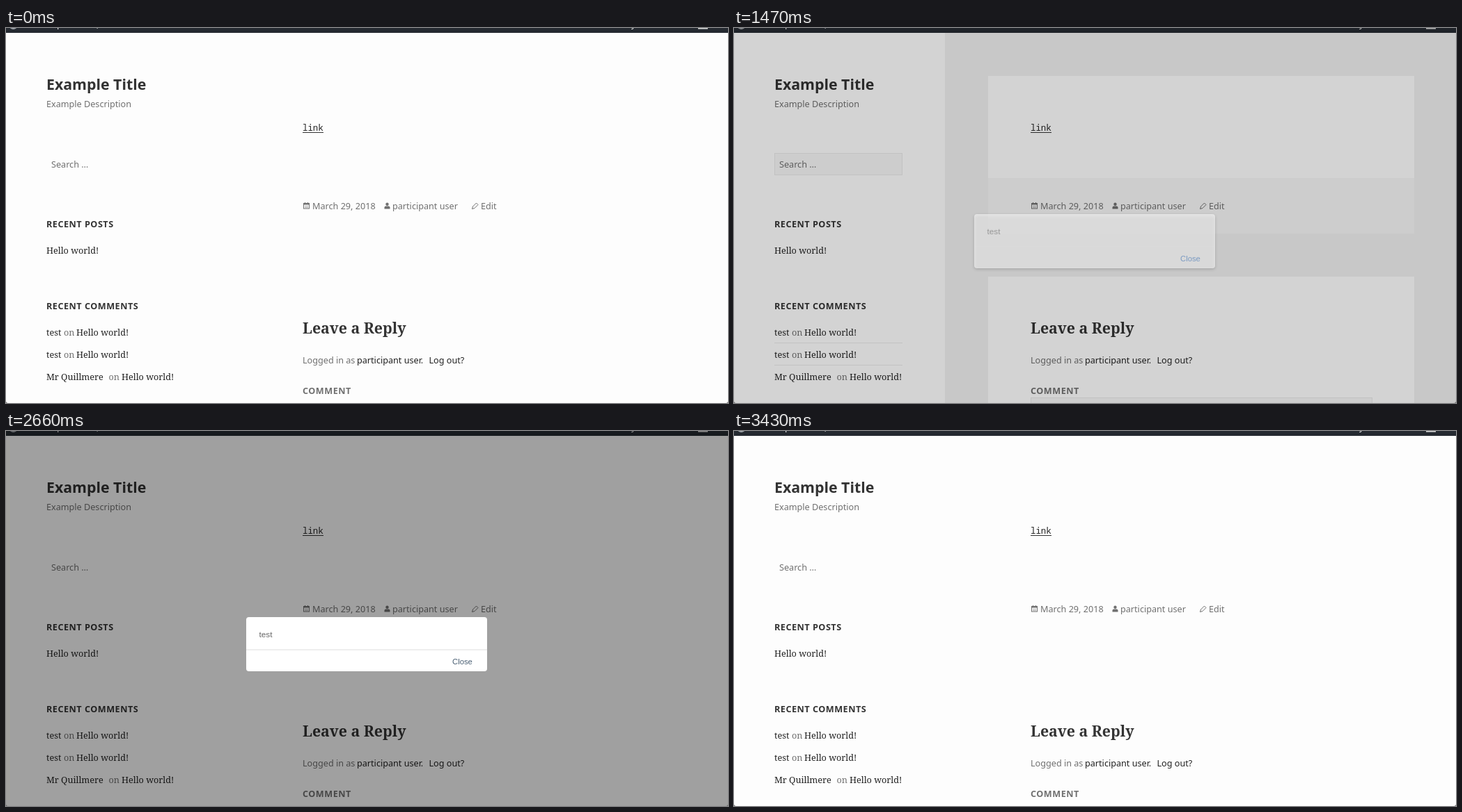
An HTML page with a canvas for the animation above (3500 ms loop, 1037x540 px).

```html
<!DOCTYPE html>
<html lang="en">
<head>
<meta charset="utf-8">
<title>Dialog over a blog page</title>
<style>
  html, body { margin: 0; width: 100%; height: 100%; overflow: hidden; background: #fdfdfd; }
  canvas { display: block; width: 1037px; height: 540px; }
</style>
</head>
<body>
<canvas id="stage" width="1037" height="540"></canvas>
<script>
const W = 1037, H = 540, LOOP = 3500, STEP = 70;
const ctx = document.getElementById('stage').getContext('2d');

const SANS = '"Noto Sans", sans-serif';
const SERIF = '"Noto Serif", serif';
const MONO = '"Noto Sans Mono", monospace';
const UI = '"Liberation Sans", Arial, sans-serif';
const BODY = 12.63, HEAD = 21.3;
const DARK = '#333', GREY = '#707070', LINK = '#222';

const USER = 'participant user';
const COMMENTS = [
  { name: 'test', on: 83, post: 101, y: 443 },
  { name: 'test', on: 83, post: 101, y: 475 },
  { name: 'Mr Quillmere', on: 147.5, post: 166, y: 506.5 }
];

// Page look, shade opacity, dialog opacity and link colour from each time on.
const SCENES = [
  { from: 0, detail: false, shade: 0, dialog: 0 },
  { from: 1470, detail: true, shade: 0.174, dialog: 0.58, link: '#356cb1' },
  { from: 1540, detail: false, shade: 0.368, dialog: 1, link: '#7d8791' },
  { from: 2100, detail: false, shade: 0.368, dialog: 1, link: '#4b6074' },
  { from: 2730, detail: true, shade: 0.305, dialog: 1, link: '#365684' },
  { from: 2800, detail: true, shade: 0.137, dialog: 0.45, link: '#365684' },
  { from: 2870, detail: false, shade: 0, dialog: 0 }
];

function rect(x, y, w, h, color) {
  ctx.fillStyle = color;
  ctx.fillRect(x, y, w, h);
}

function text(str, x, y, color, size = BODY, family = SANS, weight = 400, spacing = 0) {
  ctx.font = `${weight} ${size}px ${family}`;
  ctx.letterSpacing = spacing + 'px';
  ctx.fillStyle = color;
  ctx.fillText(str, x, y);
}

function caps(str, x, y, color) {
  text(str, x, y, color, BODY, SANS, 700, BODY * 0.04);
}

function circle(x, y, r, color) {
  ctx.fillStyle = color;
  ctx.beginPath();
  ctx.arc(x, y, r, 0, Math.PI * 2);
  ctx.fill();
}

function panels() {
  rect(0, 0, W, H, '#f1f1f1');
  rect(0, 0, 303, H, '#fff');
  rect(365, 69, 612, 147, '#fff');
  rect(365, 216, 612, 80, '#f7f7f7');
  rect(365, 358, 612, 182, '#fff');
  rect(58, 180, 184, 32, '#eaeaea');
  rect(59, 181, 182, 30, '#f7f7f7');
  rect(58, 453, 184, 1, '#eaeaea');
  rect(58, 485, 184, 1, '#eaeaea');
  rect(426, 532, 491, 8, '#eaeaea');
  rect(427, 533, 489, 7, '#f7f7f7');
}

function adminBar() {
  rect(0, 0, W, 7, '#252a31');
  circle(10.5, -4, 6, '#a0a5aa');
  text('p', 73, -1, '#eee', 13);
  text(',', 130, -1, '#eee', 13);
  text('y', 898, -1, '#eee', 13);
  rect(994, 0, 14, 1.5, '#ddd');
}

function icons() {
  ctx.strokeStyle = GREY;
  ctx.lineWidth = 1;
  ctx.strokeRect(427.5, 252.5, 8, 7.5);
  rect(427, 252, 9, 2.5, GREY);
  rect(429, 251, 1, 2, GREY);
  rect(433, 251, 1, 2, GREY);
  rect(429, 256, 5, 1, '#aaa');
  rect(429, 258, 5, 1, '#aaa');

  circle(547.5, 253.8, 2.2, GREY);
  ctx.beginPath();
  ctx.roundRect(543.5, 256.5, 8, 4, [2, 2, 0, 0]);
  ctx.fill();

  ctx.beginPath();
  ctx.moveTo(669.5, 260.5);
  ctx.lineTo(670.5, 257);
  ctx.lineTo(675.5, 252);
  ctx.lineTo(678, 254.5);
  ctx.lineTo(673, 259.5);
  ctx.closePath();
  ctx.stroke();
}

function sidebar() {
  text('Example Title', 58, 89, DARK, HEAD, SANS, 700);
  text('Example Description', 58, 114, GREY);
  text('Search …', 65, 200.5, GREY);
  caps('RECENT POSTS', 58, 287, DARK);
  text('Hello world!', 58, 325, LINK, BODY, SERIF);
  caps('RECENT COMMENTS', 58, 405, DARK);
  for (const c of COMMENTS) {
    text(c.name, 58, c.y, LINK, BODY, SERIF);
    text('on', c.on, c.y, GREY, BODY, SERIF);
    text('Hello world!', c.post, c.y, LINK, BODY, SERIF);
  }
}

function article() {
  text('link', 426, 147.5, LINK, 12.4, MONO);
  rect(426, 150, 30, 1, DARK);
  icons();
  text('March 29, 2018', 440, 261, GREY);
  text(USER, 555, 261, GREY);
  text('Edit', 682, 261, GREY);
  text('Leave a Reply', 426, 439.5, DARK, HEAD, SERIF, 700);
  text('Logged in as', 426, 483, GREY);
  text(USER + '.', 504, 483, LINK);
  text('Log out?', 607.5, 483, LINK);
  caps('COMMENT', 426, 527, GREY);
}

function dialog(scene) {
  ctx.save();
  ctx.globalAlpha = scene.dialog;
  if (scene.detail) {
    ctx.shadowColor = 'rgba(0,0,0,.3)';
    ctx.shadowBlur = 4;
    ctx.shadowOffsetY = 1.5;
  }
  ctx.fillStyle = '#fff';
  ctx.beginPath();
  ctx.roundRect(345, 268, 346, 78, 4);
  ctx.fill();
  ctx.shadowColor = 'transparent';
  rect(345, 314.5, 346, 1, '#ddd');
  text('test', 363.5, 296.5, '#666', 11.8, UI);
  text('Close', 641, 335.5, scene.link, 11.3, UI);
  ctx.restore();
}

function corners() {
  ctx.fillStyle = '#666';
  for (const [x, inward] of [[0, 1], [W, -1]]) {
    ctx.beginPath();
    ctx.moveTo(x, H - 3);
    ctx.quadraticCurveTo(x, H, x + 3 * inward, H);
    ctx.lineTo(x, H);
    ctx.fill();
  }
}

function draw(time) {
  const t = Math.floor((time % LOOP) / STEP) * STEP;
  const scene = SCENES.findLast(s => s.from <= t);
  if (scene.detail) panels();
  else rect(0, 0, W, H, '#fdfdfd');
  adminBar();
  sidebar();
  article();
  rect(0, 0, W, H, `rgba(0,0,0,${scene.shade})`);
  if (scene.dialog) dialog(scene);
  corners();
}

let start;
function tick(now) {
  start ??= now;
  draw(now - start);
  requestAnimationFrame(tick);
}
draw(0);
requestAnimationFrame(tick);
</script>
</body>
</html>
```
